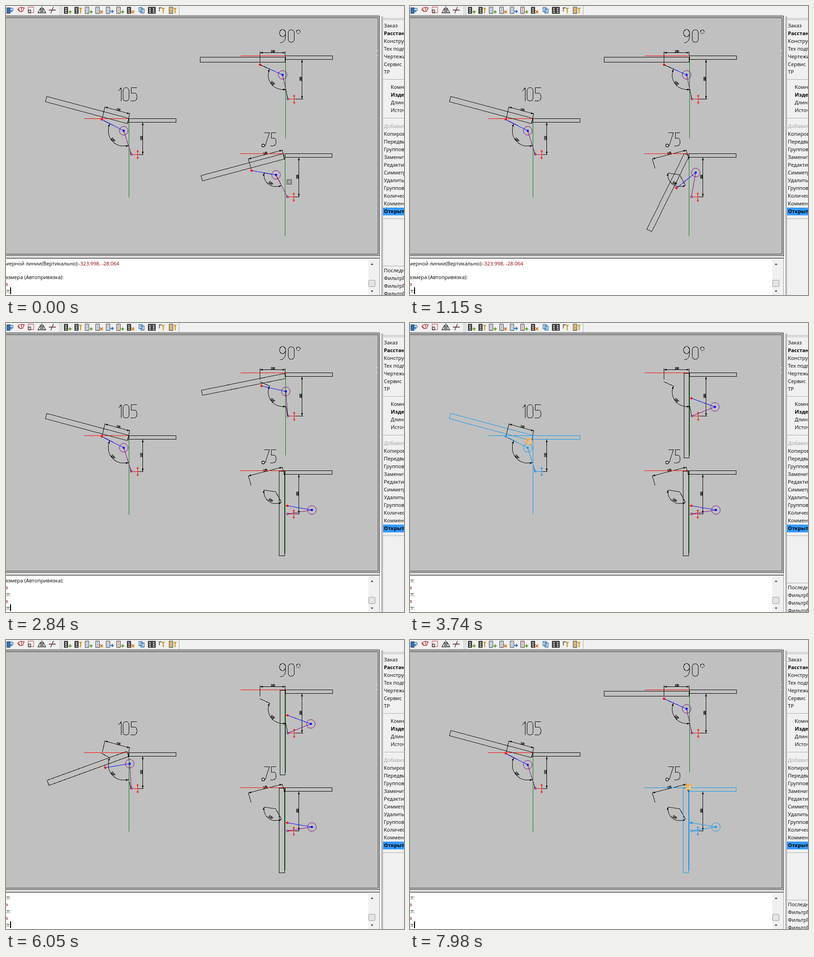
Animation of 872x635 px, one loop 8 s. Source, as an HTML page:

```html
<!DOCTYPE html>
<html lang="ru">
<head>
<meta charset="utf-8">
<title>Door linkage</title>
<style>
html, body { margin: 0; width: 100%; height: 100%; overflow: hidden; background: #f0f0f0; }
svg { display: block; }
text { font: 11.2px "Open Sans", "Noto Sans", sans-serif; white-space: pre; }
.b { font-weight: 700; }
.draw { fill: none; stroke: #000; shape-rendering: crispEdges; }
.draw text { font: bold 7.5px "Liberation Sans", sans-serif; letter-spacing: -1.4px; fill: #000; stroke: none; text-anchor: middle; }
.hot * { stroke: #0a96f0; }
.hot .dot { fill: #0a96f0; }
</style>
</head>
<body>
<svg id="stage" width="872" height="635" viewBox="0 0 872 635">
  <defs>
    <marker id="arrow" viewBox="0 0 6 4" refX="6" refY="2" markerWidth="6" markerHeight="4" orient="auto-start-reverse"><path d="M0 0L6 2L0 4Z"/></marker>
    <clipPath id="logClip"><path d="M0 557H794V635H0Z"/></clipPath>
  </defs>
</svg>
<script>
const LOOP = 8000, STEP = 60;
const stage = document.getElementById('stage');

function el(tag, attrs, parent = stage) {
  const n = document.createElementNS(stage.namespaceURI, tag);
  for (const k in attrs) n.setAttribute(k, attrs[k]);
  return parent.appendChild(n);
}
const box = (x, y, w, h, fill, p) => el('rect', { x, y, width: w, height: h, fill }, p);
const path = (d, a, p) => el('path', { d, ...a }, p);
const dot = (cx, cy, r, a, p) => el('circle', { cx, cy, r, ...a }, p);
function text(x, y, str, a, p) {
  const n = el('text', { x, y, ...a }, p);
  n.textContent = str;
  return n;
}
const show = (n, on) => n.setAttribute('visibility', on ? 'visible' : 'hidden');

// ---------- toolbar ----------
box(0, 0, 872, 635, '#f0f0f0');
box(0, 20, 818, 1, '#a0a0a0');
for (const x of [118, 122, 379]) {
  box(x, 0, 1, 20, '#a0a0a0');
  box(x + 1, 0, 1, 20, '#fff');
}
const bar = el('g', { fill: 'none', 'stroke-width': 1.3 });
path('M2 4H9V16H2Z', { fill: '#3a6ea8', stroke: '#234f80' }, bar);
path('M8 5H14Q18 8 14 11L11 11M13 8L10 11L13 14', { stroke: '#2468b8' }, bar);
path('M27 5L33 3L40 4L36 12L30 12ZM25 7L30 12M34 3V10', { stroke: '#b02020' }, bar);
path('M48.5 2.5H60.5V14.5H48.5Z', { stroke: '#c03030', 'stroke-dasharray': '2 1' }, bar);
path('M49 9H54V15H49Z', { stroke: '#333' }, bar);
path('M76 4V15H70ZM81 4V15H87ZM78.5 1V17', { stroke: '#222' }, bar);
path('M94 9H109M104 2L98 16', { stroke: '#222' }, bar);
path('M99 9H109', { stroke: '#b03030' }, bar);

const badges = {
  plus: ['M2 13H9M5.5 9.5V16.5', '#5a9a20'],
  tool: ['M3 4L5.5 7L8 4M5.5 7V16', '#c8961c'],
  cross: ['M2 10L8 16M8 10L2 16', '#d87820'],
  move: ['M0 12H8M5 9L8 12L5 15', '#2878c8']
};
function icon(x, fill, badge) {
  const dark = fill === '#444', g = el('g', { transform: `translate(${x} 0)`, 'stroke-width': 1 }, bar);
  path('M-7.5 2.5H0.5V16.5H-7.5Z', { fill, stroke: '#333' }, g);
  path('M-5 5L-2 7M-5 9L-2 11M-5 13L-2 15', { stroke: dark ? '#eee' : '#557', 'stroke-width': dark ? 1.8 : 1 }, g);
  if (badge) path(badges[badge][0], { stroke: badges[badge][1], 'stroke-width': 2.2 }, g);
}
icon(135, '#444', 'plus');
icon(158, '#444', 'tool');
icon(181, '#dde4ee', 'plus');
icon(204, '#dde4ee', 'cross');
icon(227, '#dde4ee', 'move');
icon(250, '#f4d8d8', 'plus');
icon(273, '#444', 'cross');
path('M291.5 3.5H298.5V12.5H291.5ZM295.5 6.5H302.5V15.5H295.5Z', { fill: '#dce8f6', stroke: '#2868a0' }, bar);
icon(319, '#444');
icon(327, '#444');
path('M335 4H341M336 4V12', { stroke: '#333' }, bar);
path(badges.tool[0], { stroke: badges.tool[1], 'stroke-width': 2.2, transform: 'translate(339 0)' }, bar);
icon(365, '#e8c878', 'tool');

// ---------- frames, side panel, log ----------
box(818, 549, 1, 86, '#a0a0a0');
box(0, 22, 819, 527, '#000');
box(0, 23, 818, 525, '#f0f0f0');
box(0, 25, 816, 521, '#000');
box(0, 26, 815, 519, '#c0c0c0');
box(813, 97, 2, 2, '#fff');
box(813, 108, 2, 2, '#fff');
box(0, 553, 819, 2, '#696969');
box(0, 557, 794, 78, '#fff');
box(820, 23, 1, 612, '#fff');
box(823, 23, 1, 612, '#696969');
box(825, 23, 1, 612, '#a0a0a0');

box(794, 557, 16, 78, '#f0f0f0');
path('M799 569L802 565L805 569ZM799 625L802 629L805 625Z', { fill: '#505050' });
el('rect', { x: 794.5, y: 602.5, width: 14, height: 14, rx: 1, fill: '#e4e4e4', stroke: '#999' });

function rule(y, p) {
  box(826, y, 46, 1, '#a0a0a0', p);
  box(826, y + 1, 46, 1, '#fff', p);
}
[27, 30, 161, 246, 467].forEach(y => rule(y));
box(826, 443, 46, 17, '#3399ff');
function menu(y, items, p) {
  items.forEach((s, i) => {
    const bold = s[0] === '*', sub = y === 178;
    text(sub ? 843 : 828, y + 17 * i + 4, s.replace('*', ''),
      { class: bold ? 'b' : '', fill: s === 'Добавить' ? '#a0a0a0' : '#000' }, p);
  });
}
menu(43, ['Заказ', '*Расстановка', 'Конструктор', 'Тех подготовка', 'Чертежи', 'Сервис', 'ТР']);
menu(178, ['Комната', '*Изделие', 'Длина', 'Источник']);
menu(264, ['Добавить', 'Копировать', 'Передвинуть', 'Групповая', 'Заменить', 'Редактировать',
  'Симметрия', 'Удалить', 'Групповое', 'Количество', 'Комментарий', '*Открыть']);
const recent = el('g', {});
rule(571, recent);
menu(581, ['Последние', 'ФильтрП', 'ФильтрП', 'ФильтрП'], recent);

const logBox = el('g', { 'clip-path': 'url(#logClip)' });
const log = el('g', {}, logBox);
const RED = '#8b0000';
const first = text(-2, 570, 'мерной линии(Вертикально):', {}, log);
const nums = el('tspan', { fill: RED }, first);
nums.textContent = '-323.998, -28.064';
['азмера (Автопривязка):', 'а', 'кт:', 'а', 'кт:', 'а', 'кт:'].forEach((s, i) =>
  text(s === 'кт:' ? -4 : -2, 600 + 15 * i, s, { fill: s === 'а' ? RED : '#000' }, log));
const caret = box(9, 618, 2, 15, '#000');

// ---------- drawing ----------
const draw = el('g', { class: 'draw' });
path('M246 187L252.5 180V209M256.5 187a6.5 8 0 0 1 13 0V202a6.5 7 0 0 1-13 0ZM287 179.5H274V191H281a6 8.5 0 0 1 0 17.5H273', {}, draw);
path('M612.5 59.5a6.5 8 0 0 0-13 0a6.5 8 0 0 0 13 0V66Q612 80 601 81M618.5 59a6.5 7 0 0 1 13 0V73a6.5 7 0 0 1-13 0Z', {}, draw);
dot(640.5, 56.5, 4, {}, draw);
path('M566 278.5H577L568 307M592 278.5H581V290H586a6 8.5 0 0 1 0 17H579', {}, draw);
dot(563.5, 306.5, 3, { fill: '#fff', 'stroke-width': 1.4, 'shape-rendering': 'auto' }, draw);

// door: x, y, width of the shut leaf
const models = {
  105: {
    pivot: [263.4, 252.5], door: [256.5, 248.5, 12], pin: [274.1, 305.3], fix: [274.5, 326], corner: [269.5, 247.5], drop: 165,
    dim: ['M217 222L271 237', 'M299.5 256V326', 'M227.5 259A34 34 0 0 0 268.5 306.3'],
    ext: 'M211 246L217 221M267 258L271 235M276 326.5H301M209 249L227.5 259M268.5 306.3L274 326',
    marks: [[245, 230, 15, '128'], [299, 291, -90, '133'], [232, 295, 50, '128°']]
  },
  90: {
    pivot: [605, 117], door: [600.1, 110.5, 11.4], pin: [617, 165.5], fix: [617.5, 204.5], corner: [612.5, 109.5], drop: 173,
    dim: ['M556.5 102.5H611.5', 'M648.5 118V204', 'M577.5 138.7A31.5 31.5 0 0 0 613 182.7'],
    ext: 'M556.5 124V100M611.5 110V100M620 204.5H651M556 129L577.5 138.7M613 182.7L617 204',
    marks: [[584, 102, 0, '136'], [648, 161, -90, '168'], [582, 171, 40, '128°']]
  },
  75: {
    pivot: [603.3, 330.5], door: [598.5, 325.5, 12], pin: [616.6, 401.6], fix: [616.5, 419.5], corner: [611.5, 324.5], drop: 173,
    dim: ['M531 336L605 317', 'M641.5 333V419', 'M565.3 367A26 26 0 0 0 603.4 393.8'],
    ext: 'M531 336L537 357M605 316L611 337M618 419.5H643M565.3 367L591 371L603.4 393.8',
    marks: [[568, 326, -15, '148'], [641, 376, -90, '168'], [578, 391, 35, '128°']]
  }
};

function build(m) {
  const dims = el('g', {}, draw);
  m.dim.forEach(d => path(d, { 'marker-start': 'url(#arrow)', 'marker-end': 'url(#arrow)' }, dims));
  path(m.ext, {}, dims);
  m.marks.forEach(([x, y, r, s]) => text(0, 0, s, { transform: `translate(${x} ${y}) rotate(${r})` }, dims));

  const g = m.item = el('g', {}, draw), [x, y] = m.corner, [fx, fy] = m.fix;
  path(`M${x - 99} ${y}H${x}`, { stroke: '#f00' }, g);
  el('rect', { x, y, width: 103, height: 8 }, g);
  m.swing = el('g', {}, g);
  const [dx, dy, w] = m.door;
  path(`M${dx + w + 1} ${m.pin[1]}H${m.pin[0]}`, { stroke: '#f00' }, m.swing);
  el('rect', { x: dx, y: dy, width: w, height: 186 }, m.swing);
  path(`M${x} ${y + 8}v${m.drop}`, { stroke: '#008000' }, g);

  const ax = Math.floor(fx) + 14.5;
  path(`M${fx} ${fy}H${ax + 2}M${ax} ${fy - 9}v18`, { stroke: '#f00' }, g);
  const round = { 'shape-rendering': 'auto' };
  for (const s of [-7, 8]) dot(ax, fy + s, 1.6, { stroke: '#f00', ...round }, g);
  m.rod = path('', { stroke: '#00f' }, g);
  m.arm = path('', { stroke: '#800080' }, g);
  dot(fx, fy, 2.2, { stroke: '#800080', ...round }, g);
  m.ring = dot(0, 0, 9.5, { stroke: '#800080', ...round }, g);
  m.hub = dot(0, 0, 2, { fill: '#00f', stroke: '#00f', class: 'dot', ...round }, g);
  m.end = dot(0, 0, 2, { fill: '#f00', stroke: '#f00', class: 'dot', ...round }, g);
}
for (const k in models) build(models[k]);
const legs = path('M557 129L577.5 138.7M613 182.7L617 204', {}, draw);

// Two equal links join the pin on the door to the fixed point.
function pose(m, deg) {
  const a = deg * Math.PI / 180, c = Math.cos(a), s = Math.sin(a);
  const [hx, hy] = m.pivot, [fx, fy] = m.fix;
  const x = m.pin[0] - hx, y = m.pin[1] - hy;
  const px = hx + x * c - y * s, py = hy + x * s + y * c;
  const dx = fx - px, dy = fy - py, d = Math.hypot(dx, dy);
  const h = Math.sqrt(Math.max(0, 54.4 ** 2 - d * d / 4)) / d;
  const ex = (px + fx) / 2 + dy * h, ey = (py + fy) / 2 - dx * h;
  m.swing.setAttribute('transform', `rotate(${deg} ${hx} ${hy})`);
  m.rod.setAttribute('d', `M${px} ${py}L${ex} ${ey}`);
  m.arm.setAttribute('d', `M${ex} ${ey}L${fx} ${fy}`);
  for (const [n, nx, ny] of [[m.ring, ex, ey], [m.hub, ex, ey], [m.end, px, py]]) {
    n.setAttribute('cx', nx);
    n.setAttribute('cy', ny);
  }
}

const cursor = el('g', { 'shape-rendering': 'crispEdges' });
const frame = el('rect', { x: -5, y: -5, width: 10, height: 10, fill: '#fff' }, cursor);
const core = el('rect', { x: -3, y: -3, width: 6, height: 6, fill: '#c0c0c0' }, cursor);

// ---------- timeline ----------
// model, click, swing start, swing end, panel returns, opening?
const swings = [
  [75, 730, 780, 1350, 1390, 0],
  [90, 2720, 2770, 3320, 3380, 0],
  [105, 4050, 4050, 4590, 5020, 0],
  [105, 5630, 5690, 6230, 6290, 1],
  [90, 7200, 7250, 7800, 7860, 1]
];
// model, from, to
const hovers = [
  [75, 420, 730], [90, 2410, 2720], [105, 3680, 4050],
  [105, 5510, 5630], [90, 6890, 7200], [75, 7920, LOOP]
];
// end of visibility, then points t, x, y
const trips = [
  [730, [0, 620, 386], [60, 619, 384], [540, 596, 343]],
  [2720, [1390, 596, 360], [1510, 590, 340], [1930, 532, 194], [2350, 535, 122], [2530, 535, 118]],
  [4050, [3380, 560, 190], [3500, 330, 262], [3740, 260, 259]],
  [5630, [4960, 307, 352], [5140, 290, 347], [5330, 290, 347], [5570, 262, 350]],
  [7200, [6290, 262, 350], [6830, 603, 201]],
  [LOOP, [7860, 603, 201], [7980, 609, 322]]
];
const blinks = [[400, 730], [2000, 2530], [3620, 4050], [5510, 5630], [6820, 7200]];

const within = (t, a, b) => t >= a && t < b;
const clamp = v => Math.min(1, Math.max(0, v));
const snap = (t, from) => from + Math.floor((t - from) / STEP + 1e-6) * STEP;

function moveCursor(t, hot) {
  const trip = trips.find(([end, p]) => within(t, p[0], end));
  show(cursor, !!trip);
  if (!trip) return;
  const pts = trip.slice(1), q = snap(t, pts[0][0]);
  let [, x, y] = pts[0];
  for (let i = 1; i < pts.length; i++) {
    const a = pts[i - 1], b = pts[i], k = clamp((q - a[0]) / (b[0] - a[0]));
    if (q >= a[0]) { x = a[1] + (b[1] - a[1]) * k; y = a[2] + (b[2] - a[2]) * k; }
  }
  cursor.setAttribute('transform', `translate(${Math.round(x) + .5} ${Math.round(y) + .5})`);
  frame.setAttribute('stroke', hot ? '#ffaa28' : '#222');
  frame.setAttribute('stroke-width', hot ? 2 : 1);
  core.setAttribute('stroke', hot ? '#e0a860' : '#333');
}

function render(t) {
  const angle = { 75: 75, 90: 90, 105: 105 };
  let busy = false, lines = 0;
  for (const [k, click, a, b, back, open] of swings) {
    if (t < click) continue;
    const p = clamp((snap(t, click) - a) / (b - a));
    angle[k] = k * (open ? p : 1 - p);
    if (t < back) busy = true;
    else lines = Math.min(4, lines + 2);
  }
  const hover = hovers.find(([, a, b]) => within(t, a, b));
  for (const k in models) {
    pose(models[k], angle[k]);
    models[k].item.setAttribute('class', hover && hover[0] == k ? 'hot' : '');
  }
  show(legs, t < 2410);
  show(recent, !busy);
  show(caret, !blinks.some(([a, b]) => within(t, a, b)));
  log.setAttribute('transform', `translate(0 ${-15 * lines})`);
  moveCursor(t, hover);
}

const start = performance.now();
function tick() {
  render((performance.now() - start) % LOOP);
  requestAnimationFrame(tick);
}
tick();
</script>
</body>
</html>
```
